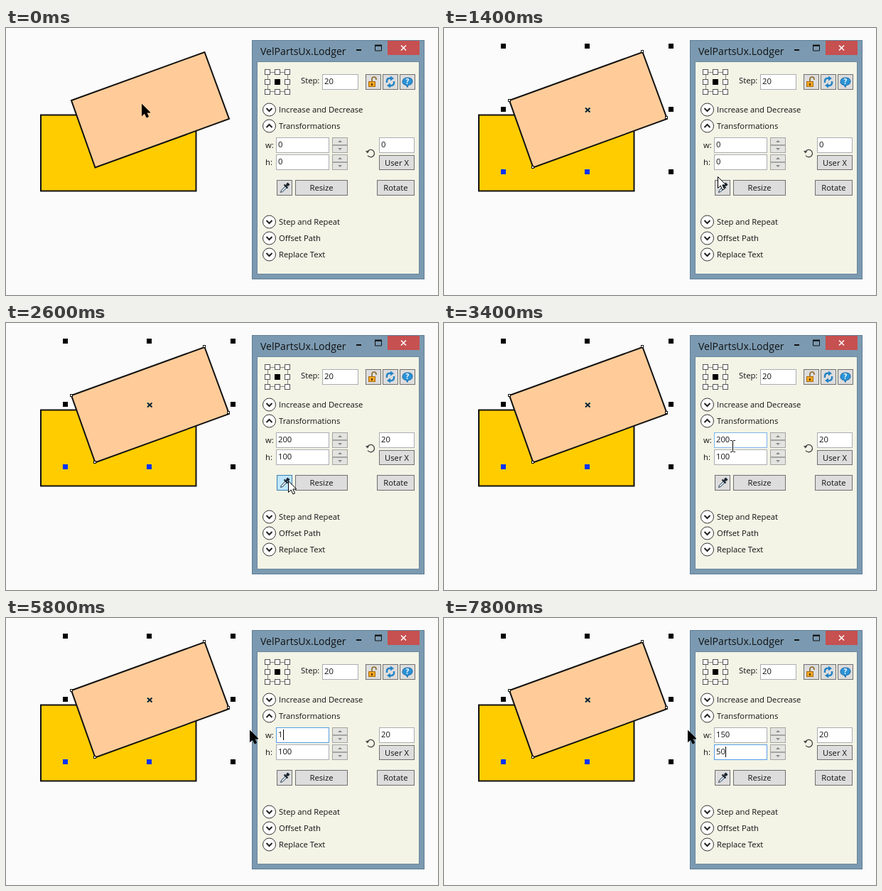
An HTML page that plays this animation: 608 by 376 pixels, repeating every 8000 ms.

```html
<!DOCTYPE html>
<html>
<head>
<meta charset="utf-8">
<style>
html, body { margin: 0; width: 100%; height: 100%; overflow: hidden; background: #fbfbfb; }
svg { display: block; }
text { font: 11.25px "Open Sans", "Noto Sans", sans-serif; fill: #111; white-space: pre; }
</style>
</head>
<body>
<svg id="stage" width="608" height="376" viewBox="0 0 608 376"></svg>
<script>
const stage = document.getElementById('stage');

function add(tag, attrs, parent = stage) {
  const el = document.createElementNS('http://www.w3.org/2000/svg', tag);
  set(el, attrs);
  return parent.appendChild(el);
}
function set(el, attrs) {
  for (const k in attrs) el.setAttribute(k, attrs[k]);
}
const show = (el, on) => set(el, { visibility: on ? 'visible' : 'hidden' });
const group = () => add('g', {});
const fillBox = (x, y, width, height, fill, parent) =>
  add('rect', { x, y, width, height, fill }, parent);
// Bordered box whose 1px outline sits inside the given bounds
const box = (x, y, w, h, fill, stroke, parent) =>
  add('rect', { x: x + .5, y: y + .5, width: w - 1, height: h - 1, fill, stroke }, parent);
const path = (d, stroke, width = 1, fill = 'none', parent) =>
  add('path', { d, stroke, 'stroke-width': width, fill }, parent);
function label(str, x, y, attrs = {}, parent) {
  const el = add('text', { x, y, ...attrs }, parent);
  el.textContent = str;
  return el;
}

const field = (x, y, w) => box(x, y, w, 22, '#fff', '#abadb3');
function button(x, y, w, str = '', h = 22) {
  const b = box(x, y, w, h, '#ddd', '#707070');
  label(str, x + w / 2, y + h / 2 + 4, { 'text-anchor': 'middle' });
  return b;
}

// Artwork
add('rect', { x: 49, y: 122.5, width: 218.5, height: 107, fill: '#fc0', stroke: '#111', 'stroke-width': 2 });
path('M92 102L279.5 34L314 128L125.5 196.5Z', '#111', 2, '#fc9');

// Selection handles
const selection = group();
[25, 114, 202].forEach((y, row) => [83, 201, 319].forEach((x, col) => {
  if (row == 1 && col == 1) return;
  fillBox(x - 3, y - 3, 7, 7, row == 2 && col < 2 ? '#03f' : '#000', selection);
}));
path('M199 112.5l6.500 6m0-6l-6.500 6', '#023', 2, 'none', selection);
for (const [x, y] of [[92, 102], [279, 33], [313, 126], [125, 196]])
  box(x - 2, y - 2, 4, 4, '#fff', '#111', selection);

// Window frame
box(346, 17, 243, 337, '#7b9ab1', '#5f7d94');
box(353, 47, 229, 300, '#f3f4e6', '#6c889d');
label('VelPartsUx.Lodger', 358, 38, { style: 'font-size:14.1px' });
path('M493 31h7', '#111', 2);
path('M519.500 25v7h9v-7z', '#111');
path('M519 24.500h10', '#111', 2);
fillBox(537, 18, 45, 20, '#c75050');
path('M556 24.500l7 7m0-7l-7 7', '#fff', 1.6);

// Anchor grid
add('rect', { x: 368.5, y: 62.5, width: 28, height: 27, fill: 'none', stroke: '#888' });
[62, 76, 90].forEach((y, row) => [368, 382, 396].forEach((x, col) => {
  if (row == 1 && col == 1) fillBox(x - 4, y - 4, 8, 8, '#000');
  else box(x - 4, y - 4, 8, 8, '#fff', '#555');
}));

label('Step:', 415, 78);
field(445, 65, 51);
label('20', 448, 79);

for (const x of [506, 530, 554]) button(x, 65, 22);
path('M515 75v-3a3 3 0 0 1 6 0v1', '#8a6a2a', 1.6);
box(510, 75, 10, 8, '#f5a623', '#a86a10');
fillBox(514, 78, 2, 3, '#5a3a08');
path('M536 77v-3q1-4 6-3M546 75v3q-1 4-6 3', '#2383c4', 2.4);
path('M541 67.500l5 3.500l-5 3.500zM541 77.500l-5 3.500l5 3.500z', 'none', 0, '#2383c4');
path('M558 76q0-6 7-6t7 5t-6 5.500l-1 3l-2-3q-5-1-5-4.500z', '#1667a8', 1, '#2b93d6');
label('?', 565, 79, { 'text-anchor': 'middle', style: 'font-size:10px;font-weight:bold;fill:#fff' });

// Expanders
[['Increase and Decrease', 115], ['Transformations', 138, true], ['Step and Repeat', 273],
 ['Offset Path', 296], ['Replace Text', 319]].forEach(([str, y, open]) => {
  add('circle', { cx: 370.5, cy: y, r: 9, fill: '#fff', stroke: '#333' });
  path(open ? `M366.500 ${y + 2}l4-4l4 4` : `M366.500 ${y - 2}l4 4l4-4`, '#222', 2);
  label(str, 384, y + 4);
});

// Size fields, spinners and rotation
const fields = [154, 178].map((y, i) => {
  label('wh'[i] + ':', 365, y + 15);
  const frame = field(380, y, 75);
  const mark = fillBox(383, y + 3, 20, 15, '#99c9f2');
  const value = label('0', 383, y + 14);
  const caret = fillBox(0, y + 3, 1, 15, '#000');
  for (const dy of [0, 11]) {
    box(459, y + dy, 22, 11, '#e3e3e0', '#a5a5a2');
    path(dy ? `M467 ${y + 15}h6l-3 3z` : `M467 ${y + 7}h6l-3-3z`, 'none', 0, '#888');
  }
  return { frame, mark, value, caret };
});
path('M509 179.500a5.200 5.200 0 1 0-.5-5', '#444', 1.3);
path('M506 173l2.500 3.500l3-3z', 'none', 0, '#444');
field(525, 154, 50);
const angle = label('0', 528, 168);
button(525, 179, 50, 'User X', 21);
const picker = button(381, 214, 22);
path('M386.500 231.500l1-3l6-6l2 2l-6 6z', '#345', 1, '#cde');
path('M391.500 220.500l5 5M394 223l3.500-3.500', '#1b2530', 2.2);
path('M395.500 221.500l2.500-2.500', '#1b2530', 4.5);
button(407, 214, 74, 'Resize');
button(522, 214, 53, 'Rotate');

// Key hint, click hint and pointers
const tab = group();
box(298, 151, 29, 22, '#fff', '#111', tab);
label('Tab', 312.5, 166, { 'text-anchor': 'middle', style: 'font:bold 10.5px "DejaVu Sans",sans-serif' }, tab);

const click = group();
add('rect', { x: .5, y: .5, width: 14, height: 14, rx: 2, fill: '#f4f4f4', stroke: '#888' }, click);
add('rect', { x: 3.5, y: 2.5, width: 8, height: 10, rx: 3, fill: '#fff', stroke: '#111' }, click);
path('M7.500 3v4.500M4 7.500h7', '#111', 1, 'none', click);
fillBox(4, 3, 3, 4, '#111', click);

const arrow = path('M.5 .5v16l3.700-3.500l2.800 6l2.500-1.200l-2.700-5.800h5z', '#000', 1);
const beam = group();
for (const [color, width] of [['#fff', 2.5], ['#000', 1]])
  path('M5 .5h2.500l1 1l1-1H12M8.500 1v15M5 16.500h2.500l1-1l1 1H12', color, width, 'none', beam);

// Pointer waypoints: time, x, y
const track = [[600, 191, 107], [1400, 385, 209], [1600, 393, 218], [1800, 397, 222], [2800, 397, 222],
  [3000, 399, 210], [3200, 399, 187], [3400, 398, 165], [3600, 397, 157], [4400, 397, 157],
  [4600, 374, 157], [4800, 343, 158]];

function pointer(t) {
  const i = track.findIndex(p => p[0] >= t);
  if (i < 0) return track[track.length - 1].slice(1);
  if (i == 0) return track[0].slice(1);
  const [t0, x0, y0] = track[i - 1], [t1, x1, y1] = track[i], k = (t - t0) / (t1 - t0);
  return [Math.round(x0 + (x1 - x0) * k), Math.round(y0 + (y1 - y0) * k)];
}
const within = (t, a, b) => t >= a && t < b;

function showField({ frame, mark, value, caret }, str, focus, selected, blink, hover) {
  value.textContent = str;
  set(frame, { stroke: focus ? '#569de5' : hover ? '#7eb4ea' : '#abadb3' });
  set(caret, { x: Math.round(383 + str.length * 6.5) });
  show(mark, selected);
  show(caret, focus && blink && !selected);
}

function draw(t) {
  const [x, y] = pointer(t);
  const overText = within(t, 3200, 4800);
  const picked = t >= 2200;

  show(selection, t >= 200);
  show(tab, within(t, 6600, 7400));
  show(click, within(t, 200, 800) || within(t, 2000, 2600) || within(t, 4000, 4800));
  set(click, { transform: `translate(${x - 19} ${y - 18})` });
  show(arrow, !overText);
  show(beam, overText);
  set(arrow, { transform: `translate(${x} ${y})`, fill: x < 346 ? '#000' : '#fff' });
  set(beam, { transform: `translate(${x} ${y})` });

  const hot = within(t, 1600, 3000);
  set(picker, { fill: hot ? '#bee6fd' : '#ddd', stroke: hot ? '#3c7fb1' : '#707070' });

  const w = !picked ? '0' : t < 5800 ? '200' : t < 6000 ? '1' : '150';
  const h = !picked ? '0' : t < 7600 ? '100' : t < 7800 ? '5' : '50';
  showField(fields[0], w, within(t, 4000, 6600), within(t, 4600, 5800), t >= 4400, within(t, 3400, 4000));
  showField(fields[1], h, t >= 6600, within(t, 6600, 7600), true, within(t, 3200, 3400));
  angle.textContent = picked ? '20' : '0';
}

function tick(now) {
  draw(Math.floor(now % 8000 / 200) * 200);
  requestAnimationFrame(tick);
}
draw(0);
requestAnimationFrame(tick);
</script>
</body>
</html>
```
